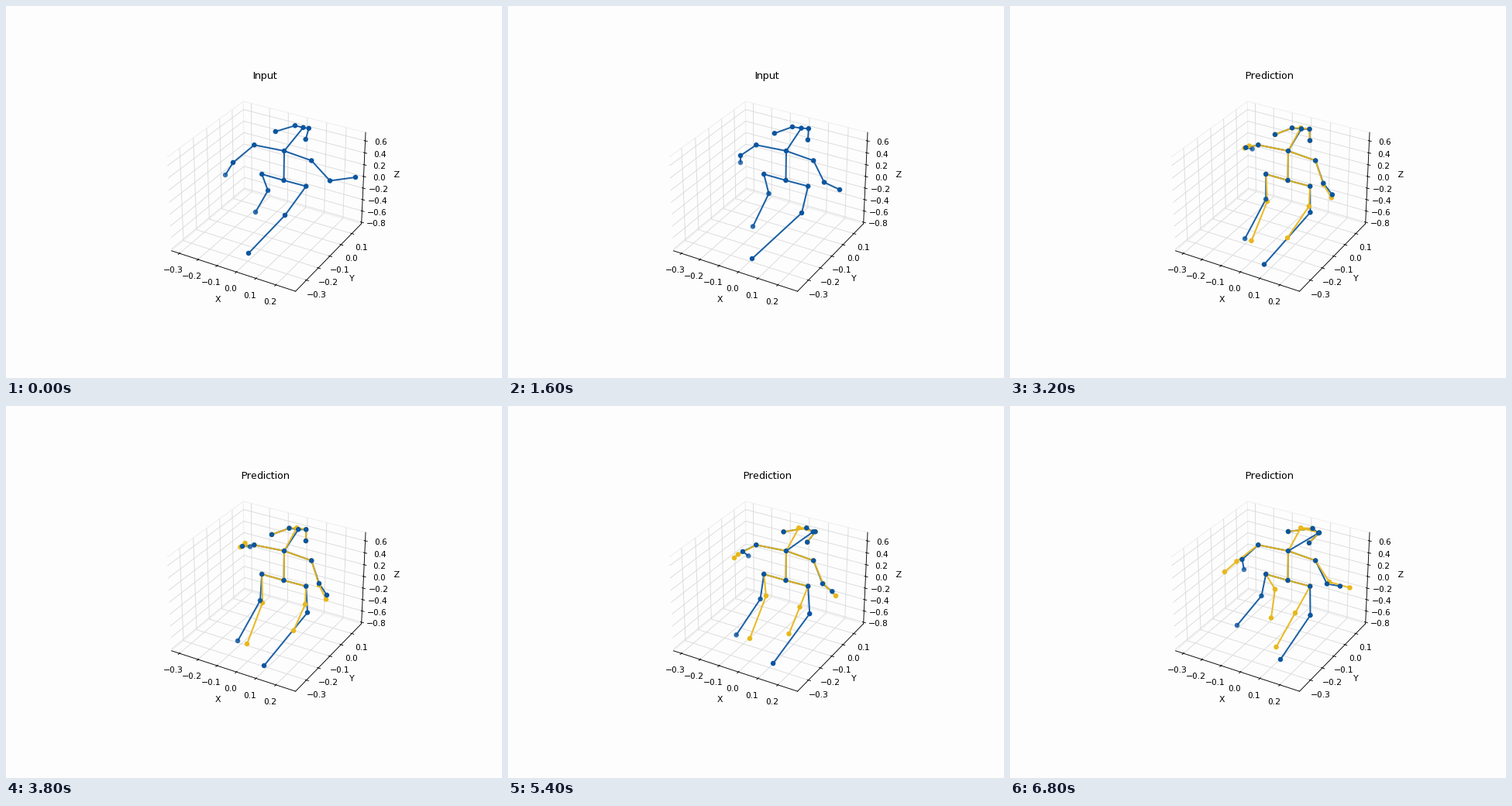
Animation, 640 px wide and 480 px high, one loop 7000 ms. Source, as a matplotlib script:

```python
import numpy as np
import matplotlib.pyplot as plt
from matplotlib.animation import FuncAnimation
from matplotlib.collections import LineCollection
from matplotlib.colors import to_rgba

W, H, DPI = 640, 480, 80
FRAMES, INTERVAL = 35, 200
START = 10                      # first predicted frame
BLUE, YELLOW = "#0b559f", "#e8b71c"
TIME = np.arange(FRAMES)

plt.rcParams.update({"grid.color": "#dadada", "grid.linewidth": 0.8,
                     "text.hinting_factor": 1})


def smoothstep(a, b):
    t = np.clip((TIME - a) / (b - a), 0, 1)
    return t * t * (3 - 2 * t)


def curve(keys, points):
    """Cubic Hermite curve through a few key points, one row per frame."""
    keys, points = np.array(keys, float), np.array(points, float)
    slopes = np.gradient(points, keys, axis=0)
    i = np.clip(np.searchsorted(keys, TIME, side="right") - 1, 0, len(keys) - 2)
    span = (keys[i + 1] - keys[i])[:, None]
    t = np.clip((TIME - keys[i])[:, None] / span, 0, 1)
    ease = t * t * (3 - 2 * t)
    return (points[i] + (points[i + 1] - points[i]) * ease
            + span * t * (1 - t) * ((1 - t) * slopes[i] - t * slopes[i + 1]))


def still(x, y):
    return np.tile([float(x), float(y)], (FRAMES, 1))


def swing(*points):
    return curve([0, 8, 19, 34], points)


def predict(name, *points):
    """Leave the observed pose at START and drift away from it."""
    return curve([START, 19, 27, 34], [true[name][START], *points])


# The head turns a little left, then right, and sinks slowly
turn = 0.34 * (1 - smoothstep(0, 13)) + smoothstep(17, 31)
sink = TIME / (FRAMES - 1)


def head(x, y, dx, dy, drop):
    return np.column_stack([x + dx * turn, y + dy * turn + drop * sink])


true = {
    "pelvis": still(358.5, 225),
    "neck": still(359, 187),
    "l_hip": still(330.2, 217),
    "r_hip": still(387.2, 232.6),
    "l_shoulder": still(320.3, 179.3),
    "r_shoulder": still(394.2, 199.5),
    "l_knee": swing((338, 238), (336.5, 242), (328, 251), (324.5, 245)),
    "l_ankle": swing((322, 266), (316, 284.5), (299, 303), (293, 283)),
    "r_knee": swing((360, 270), (379, 267), (389, 266.5), (387.5, 270)),
    "r_ankle": swing((313, 319), (315, 326), (333, 335), (349, 327)),
    "l_elbow": swing((293, 202), (300, 193), (305, 181), (299.5, 198)),
    "l_wrist": swing((283, 218), (300, 202), (315, 181.5), (302, 211)),
    "r_elbow": swing((418, 225.5), (408, 227.5), (404, 229), (409, 229.5)),
    "r_wrist": swing((451, 221), (428, 237), (414, 244), (426, 232.5)),
    "nose": head(376, 156, 22, 2.5, 5.5),
    "l_eye": head(364, 155, 26.5, -2, 5),
    "l_ear": head(342, 164, 17, -6, 4),
    "r_eye": head(386.5, 157, 12.5, 2.5, 4),
    "r_ear": head(387, 171.7, -1, 1, 4),
}

pred = {
    **true,
    "nose": still(375.2, 157.3),
    "l_knee": predict("l_knee", (331, 254), (333, 245), (342, 236.5)),
    "l_ankle": predict("l_ankle", (311, 307), (312, 300), (337, 273.5)),
    "r_knee": predict("r_knee", (386, 256), (376.5, 259.5), (368, 267)),
    "r_ankle": predict("r_ankle", (371, 290), (362.5, 294), (343.5, 311)),
    "l_elbow": predict("l_elbow", (302.5, 182), (297, 191.5), (292.5, 200.5)),
    "l_wrist": predict("l_wrist", (308.5, 177), (292, 196), (277, 214)),
    "r_elbow": predict("r_elbow", (404, 231), (406.5, 229), (412, 227)),
    "r_wrist": predict("r_wrist", (413, 249.5), (423, 245), (438.5, 234.5)),
}

# Far joints are drawn paler
FADE = {"l_ankle": 0.84, "l_knee": 0.9, "l_wrist": 0.78}

CHAINS = [chain.split() for chain in (
    "pelvis l_hip l_knee l_ankle",
    "pelvis r_hip r_knee r_ankle",
    "pelvis neck nose",
    "neck l_shoulder l_elbow l_wrist",
    "neck r_shoulder r_elbow r_wrist",
    "nose l_eye l_ear",
    "nose r_eye r_ear",
)]

fig = plt.figure(figsize=(W / DPI, H / DPI), dpi=DPI, facecolor="#fdfdfd")

# Empty 3D box with its axes
SIDE = 285
box = fig.add_axes([192 / W, 93.9 / H, SIDE / W, SIDE / H], projection="3d")
box.set_facecolor("none")
box.view_init(elev=30, azim=-60)
box.set_xticks(np.arange(-3, 3) / 10)
box.set_yticks(np.arange(-3, 2) / 10)
box.set_zticks(np.arange(-4, 4) / 5)
box.set(xlim=(-0.343, 0.297), ylim=(-0.389, 0.192), zlim=(-0.826, 0.738))
for axis, name in zip((box.xaxis, box.yaxis, box.zaxis), "XYZ"):
    axis.set_label_text(name)
    axis.labelpad = 3
    axis.set_tick_params(pad=3)
    axis.pane.fill = False
    axis.pane.set_alpha(1)
    axis.pane.set_edgecolor("#f0f0f0")
title = box.set_title("Input", y=1)
title.set_y(1)                  # 3D axes lower their title by default

# Skeletons on a pixel layer above the box
stage = fig.add_axes([0, 0, 1, 1])
stage.set(xlim=(0, W), ylim=(H, 0))
stage.axis("off")


class Skeleton:
    def __init__(self, joints, color, width, line_z, dot_z, fade):
        self.joints = joints
        self.bones = LineCollection([], colors=color, linewidths=width,
                                    alpha=0.93, zorder=line_z)
        stage.add_collection(self.bones, autolim=False)
        blank = np.zeros(len(joints))
        self.dots = stage.scatter(
            blank, blank, s=34, linewidths=0, zorder=dot_z,
            color=[to_rgba(color, fade.get(name, 1)) for name in joints])

    def pose(self, frame):
        self.bones.set_segments(
            [[self.joints[name][frame] for name in chain] for chain in CHAINS])
        self.dots.set_offsets([path[frame] for path in self.joints.values()])

    def show(self, on):
        self.bones.set_visible(on)
        self.dots.set_visible(on)


observed = Skeleton(true, BLUE, 1.8, 3, 6, FADE)
predicted = Skeleton(pred, YELLOW, 1.9, 4, 5, {})


def update(frame):
    predicting = frame >= START
    title.set_text("Prediction" if predicting else "Input")
    observed.pose(frame)
    predicted.pose(frame)
    predicted.show(predicting)
    return []


anim = FuncAnimation(fig, update, frames=FRAMES, interval=INTERVAL,
                     repeat=True, repeat_delay=0, blit=False)
plt.show()
```
